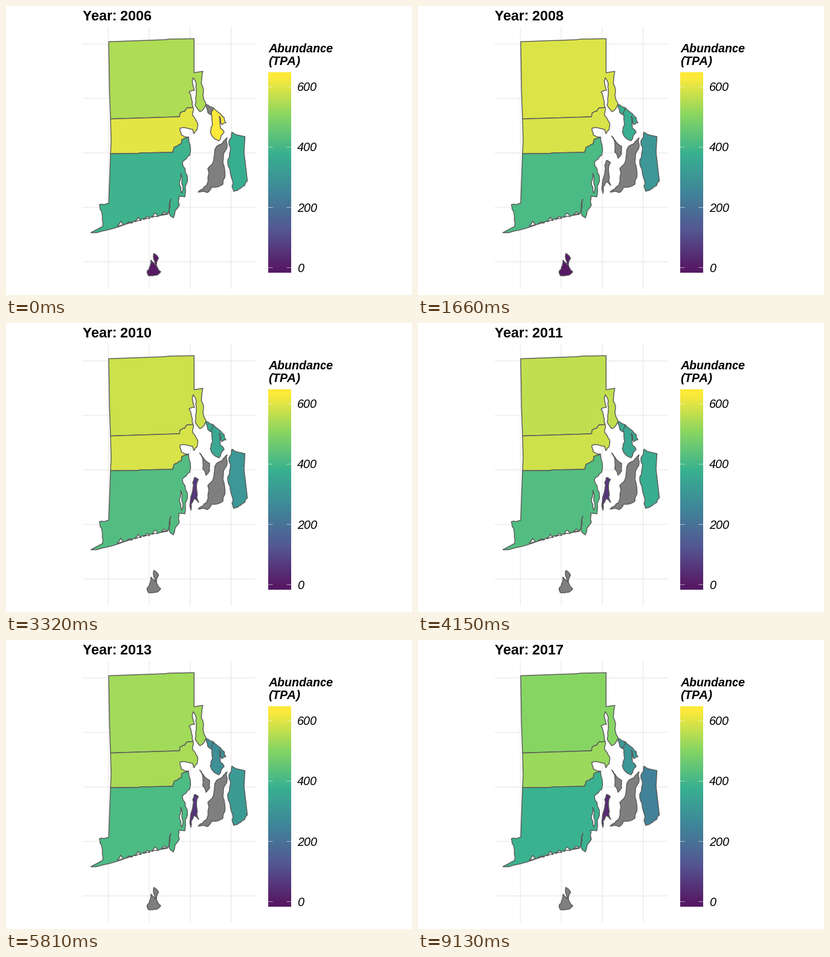
A matplotlib script for the animation above (9.96 s loop, 672 by 480 pixels).

```python
import matplotlib.pyplot as plt
import numpy as np
from matplotlib.animation import FuncAnimation
from matplotlib.colors import LinearSegmentedColormap
from matplotlib.patches import Polygon

W, H, DPI = 672, 480, 100
PX = 72 / DPI
FIRST_YEAR, YEARS = 2006, 12
TOP = 631
GREY, EDGE = "#7f7f7f", "#595959"

# Whole-pixel glyph advances
plt.rcParams.update({"font.family": "Liberation Sans", "text.hinting": "default",
                     "text.hinting_factor": 1})

viridis6 = LinearSegmentedColormap.from_list(
    "viridis6", ["#440154", "#414487", "#2a788e", "#22a884", "#7ad151", "#fde725"], 1024)
rng = np.random.default_rng(7)


def tint(value):
    """Viridis at 90 % opacity over white."""
    return 0.9 * np.array(viridis6(value / TOP))[..., :3] + 0.1


def coast(*points, rough=0.13, rounds=2):
    """Crinkled shoreline: push the middle of each stretch sideways, repeatedly."""
    line = np.array(points, float)
    for _ in range(rounds):
        step = np.diff(line, axis=0)
        normal = step[:, ::-1] * (1, -1)
        reach = np.clip(rng.uniform(-rough, rough, (len(step), 1)) * normal, -2, 2)
        middle = line[:-1] + step / 2 + reach
        line = np.vstack([np.stack([line[:-1], middle], 1).reshape(-1, 2), line[-1:]])
    return line.tolist()


def island(*points):
    return coast(*points, points[0])


# Shores shared by neighbours, west to east
north_bay = coast((287, 184), (289, 177), (296, 175), (300, 169), (309.5, 168))
south_bay = coast((276, 243), (278, 235), (290, 229), (291, 222), (302, 217.5))
north_border = [(173, 187.6)] + north_bay
south_border = [(173, 245.3), (219, 245), (222, 244)] + south_bay

providence = [(170, 59.3), (262, 56), (270, 55), (311.3, 54.3), (311.3, 110.8)] + coast(
    (325.8, 108.5), (326, 135), (327, 153), (331, 163.5), (321, 175.5), (313, 164), (315, 147),
    (315, 130), (310, 119), (312, 140), (303, 143), (308, 158), (309.5, 168),
) + north_border[::-1] + [(171.3, 140)]

kent = north_border + coast(
    (309.5, 168), (309, 182), (317, 194), (316, 206), (311, 212), (309, 205), (288, 203),
    (290, 214), (302, 217.5),
) + south_border[::-1] + [(174, 224)]

washington = south_border + coast(
    (302, 217.5), (304, 248), (292, 259), (300, 282), (296, 317), (286, 316), (287, 331),
    (277, 352), (270, 345), (273, 321), (267, 346),
) + coast((237, 351), (187, 366.5), (150, 376.5), (140.5, 376.5), rough=0.02) + coast(
    (160, 366), (159, 345), (154.5, 330), (170, 327.5),
) + [(171, 300)]

warren = island((331, 163.5), (343, 169), (342, 181), (334, 177))
bristol = island((343, 169), (355, 179), (364, 194), (357, 197), (353, 183), (355, 203),
                 (361, 210), (352.5, 224), (342, 217), (338, 209), (342, 196), (341, 184))
tiverton = [(374, 209.5), (380, 213.5), (395.5, 217), (394, 243)] + coast(
    (399.5, 290.5), (388, 303), (377, 308), (375, 290), (368, 266), (370, 246), (369, 224),
    (374, 209.5))
aquidneck = island((348, 234), (358, 228), (366, 219), (366, 233), (360, 247), (362, 272),
                   (359, 296), (340, 301), (333, 310), (318, 309), (332, 298), (334, 270),
                   (344, 255))
prudence = island((320.5, 216), (328, 226), (337, 233), (337, 246), (331, 253), (326, 243),
                  (326, 230))
jamestown = island((312, 256.5), (318.5, 260), (316, 280), (319, 298), (311, 292), (306, 311),
                   (308, 282), (309, 265))
block_island = island((233.3, 442), (239, 431), (240, 422), (247, 430), (244.5, 411),
                      (252.5, 419), (249, 431), (256, 441), (250, 447), (236, 448))
narrow_river = island((289, 278), (291, 290), (291, 311), (287, 292))


def pond(x):
    """Salt lagoon just behind the south shore."""
    shore = 366 - 0.245 * (x - 187)
    return island((x - 6, shore), (x, shore - rng.uniform(3, 8)), (x + 5, shore - 2))


ponds = [pond(x) for x in np.linspace(190, 262, 6)]

# Trees per acre at key years, linear between them; no data outside a region's span
REGIONS = [
    (providence, {2006: 546, 2007: 596, 2009: 592, 2011: 565, 2012: 540, 2017: 503}),
    (kent, {2006: 603, 2007: 579, 2009: 600, 2012: 569, 2013: 541, 2017: 525}),
    (washington, {2006: 388, 2009: 422, 2011: 422, 2014: 408, 2015: 390, 2017: 382}),
    (warren, {2007: 385, 2009: 355, 2011: 352, 2012: 275, 2017: 305}),
    (bristol, {2006: TOP, 2007: 385, 2009: 355, 2011: 352, 2012: 275, 2017: 305}),
    (tiverton, {2006: 372, 2007: 305, 2010: 305, 2011: 368, 2013: 312, 2017: 243}),
    (aquidneck, {}),
    (prudence, {}),
    (jamestown, {2010: 60, 2014: 55, 2017: 35}),
    (block_island, {2006: 0, 2009: 0}),
]


def region_color(keys, year):
    if not keys or not min(keys) <= year <= max(keys):
        return GREY
    return tint(np.interp(year, list(keys), list(keys.values())))


fig = plt.figure(figsize=(W / DPI, H / DPI), dpi=DPI, facecolor="white")
ax = fig.add_axes([0, 0, 1, 1])
ax.axis("off")


def line(xs, ys, color, width, **kw):
    ax.plot(xs, ys, color=color, lw=width * PX, solid_capstyle="butt", snap=False, **kw)


def label(x, y, text, size, **kw):
    return ax.text(x, y, text, fontsize=size * PX, va="baseline", **kw)


def shape(points, fill, z):
    return ax.add_patch(Polygon(points, facecolor=fill, edgecolor=EDGE, lw=1.4 * PX,
                                joinstyle="round", zorder=z))


for i in range(5):
    if i < 4:
        x = 169.5 + 67.75 * i
        line([x, x], [35, 469], "#ebebeb", 1.4, zorder=1)
    y = 63 + 90.5 * i
    line([127, 413], [y, y], "#ebebeb", 1.4, zorder=1)

patches = [shape(points, GREY, 3) for points, _ in REGIONS]
for water in ponds + [narrow_river]:
    shape(water, "white", 4)

# Colour bar: its end colours sit half a bin inside the bar
BAR_L, BAR_R, BAR_T, BAR_B = 434, 472, 110, 443
ZERO_Y, UNIT = 434.7, 0.501
rows = np.arange(BAR_T, BAR_B) + 0.5
ramp = tint(np.clip((ZERO_Y - rows) / UNIT, 0, TOP))
ax.imshow(ramp[:, None, :], extent=(BAR_L, BAR_R, BAR_B, BAR_T), aspect="auto",
          interpolation="nearest", zorder=2)
for value in range(0, 601, 200):
    y = ZERO_Y - UNIT * value
    for x in (BAR_L, BAR_R - 7.6):
        line([x, x + 7.6], [y, y], "white", 0.7, alpha=0.8, zorder=3)
    label(482, y + 7.2, str(value), 20, style="italic")

label(434, 77, "Abundance", 20, weight="bold", style="italic")
label(434, 98, "(TPA)", 20, weight="bold", style="italic")
title = label(127, 24, "", 23, weight="bold")

ax.set_xlim(0, W)
ax.set_ylim(H, 0)


def update(i):
    year = FIRST_YEAR + i
    title.set_text(f"Year: {year}")
    for patch, (points, keys) in zip(patches, REGIONS):
        patch.set_facecolor(region_color(keys, year))
        patch.set_visible(i > 0 or points not in (prudence, jamestown))
    return [title] + patches


anim = FuncAnimation(fig, update, frames=YEARS, interval=830, repeat=True, repeat_delay=0)
plt.show()
```
